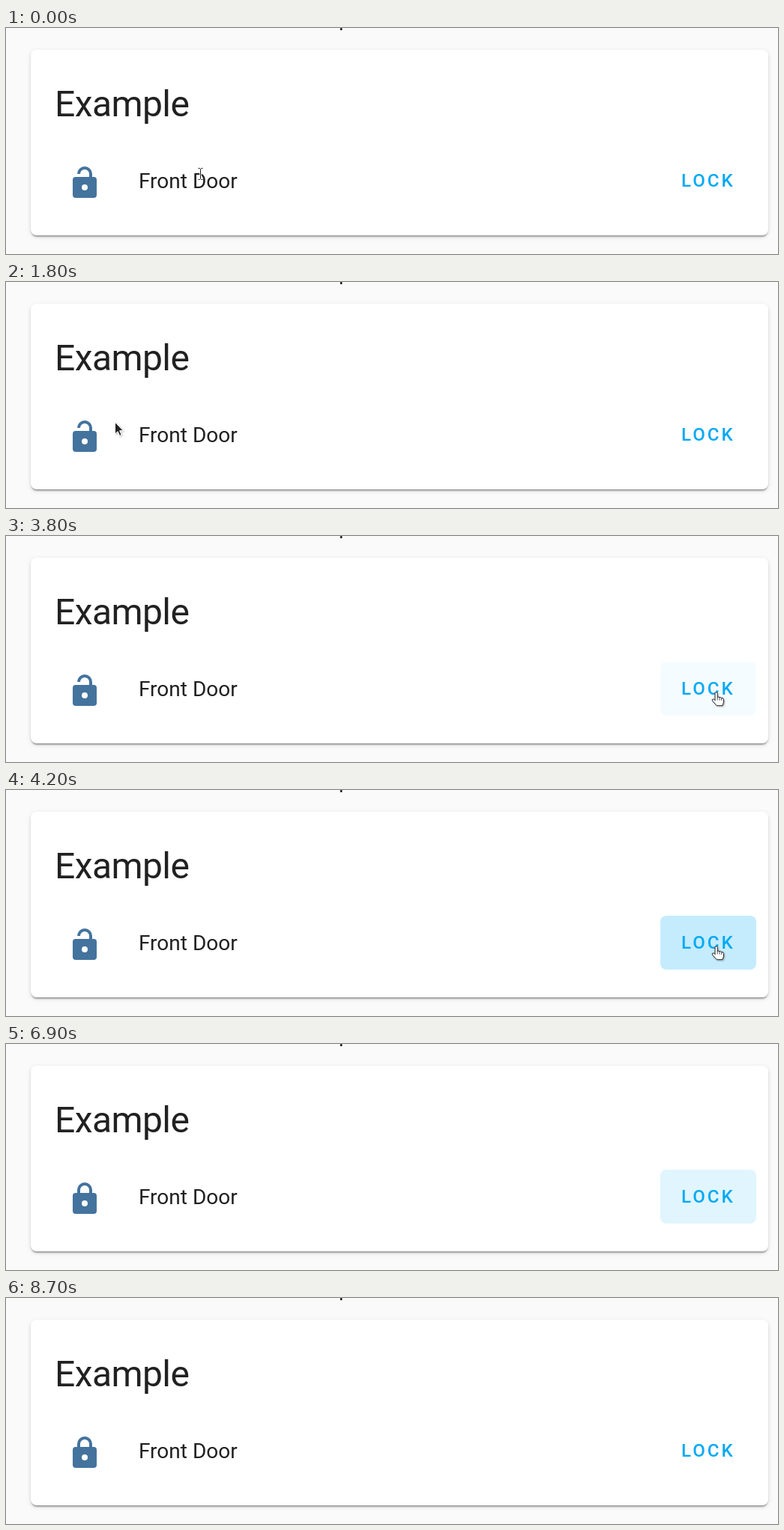
Animation of 1030x302 px, one loop 8.8 s. Source, as an HTML page:

```html
<!DOCTYPE html>
<html lang="en">
<head>
<meta charset="utf-8">
<title>Lock card</title>
<style>
  html, body { margin: 0; width: 100%; height: 100%; overflow: hidden; background: #fafafa; }
  .card {
    position: absolute; left: 33px; top: 29px; width: 984px; height: 248px;
    border-radius: 8px; background: #fff;
    box-shadow: 0 4px 2px -2px rgba(0,0,0,.2), 0 2px 2px 0 rgba(0,0,0,.14), 0 2px 6px 0 rgba(0,0,0,.12);
  }
  svg { position: absolute; left: 0; top: 0; display: block; }
  text { font-family: Roboto, sans-serif; fill: #212121; white-space: pre; }
  .title { font-size: 48px; letter-spacing: -.576px; }
  .body { font-size: 28px; }
  #label { font-size: 24px; font-weight: 500; letter-spacing: 3px; fill: #03a9f4; }
</style>
</head>
<body>
<div class="card"></div>
<svg width="1030" height="302" viewBox="0 0 1030 302">
  <defs>
    <clipPath id="clip"><rect x="873" y="168" width="128" height="72" rx="8"/></clipPath>
    <filter id="shade" x="-50%" y="-50%" width="200%" height="200%">
      <feDropShadow dx="1" dy="1" stdDeviation="1" flood-opacity=".3"/>
    </filter>
  </defs>
  <text class="body" x="444" y="-3">p</text>
  <text class="title" x="65" y="118">Example</text>
  <path id="icon" transform="translate(81 183) scale(2)" fill="#44739e" fill-rule="evenodd"/>
  <rect id="mark" y="188" height="33" fill="#e95420"/>
  <text class="body" x="177" y="214"><tspan id="first">Front </tspan><tspan id="second">Door</tspan></text>
  <g clip-path="url(#clip)" fill="#03a9f4">
    <rect id="tint" x="873" y="168" width="128" height="72"/>
    <circle id="ripple"/>
  </g>
  <text id="label" x="901" y="212">LOCK</text>
  <g id="beam" fill="none">
    <path id="beamBack" stroke="#fff" stroke-opacity=".8" stroke-width="3" d="M-3 .5h2l1 1 1-1h2M0 1.5v13M-3 15.5h2l1-1 1 1h2"/>
    <path stroke="#222" d="M-3 .5h2l1 1 1-1h2M0 1.5v13M-3 15.5h2l1-1 1 1h2"/>
  </g>
  <g id="arrow" filter="url(#shade)">
    <path d="M.5 .3V16L4.1 12.7 6.7 18.5 9.2 17.4 6.6 11.7H11.4Z" fill="#222" stroke="#fff" stroke-linejoin="round"/>
  </g>
  <g id="hand" filter="url(#shade)" fill="#fff" stroke="#222" stroke-linejoin="round" stroke-linecap="round">
    <path d="M4.5 10.5V2.3a1.6 1.6 0 0 1 3.2 0V7.3q1.6-.8 2.8.5 1.6-.6 2.7.7 2.8-.3 2.8 2.2V14l-1.4 4.7H6.8L1 12.3Q0 10.3 1.8 9.9 3 9.7 4.5 11.4Z"/>
    <path d="M7.7 7.5V11M10.5 8V11.2M13.2 8.7V11.5" fill="none" stroke-width=".8"/>
  </g>
</svg>
<script>
const LOOP = 8800, STEP = 100;
const $ = id => document.getElementById(id);
const set = (id, attrs) => { for (const k in attrs) $(id).setAttribute(k, attrs[k]); };
const mix = (a, b, k) => a + (b - a) * k;
const smooth = k => k * k * (3 - 2 * k);

const hole = "M12,17A2,2 0 0,0 14,15A2,2 0 0,0 12,13A2,2 0 0,0 10,15A2,2 0 0,0 12,17Z";
const body = "M18,8A2,2 0 0,1 20,10V20A2,2 0 0,1 18,22H6A2,2 0 0,1 4,20V10A2,2 0 0,1 6,8";
const icons = {
  open: body + "H15V6A3,3 0 0,0 9,6H7A5,5 0 0,1 17,6V8Z" + hole,
  shut: body + "H7V6A5,5 0 0,1 17,6V8ZM12,3A3,3 0 0,0 9,6V8H15V6A3,3 0 0,0 12,3Z" + hole,
  wait: "M8.5,2C6,2 4,4 4,6.5V7C2.89,7 2,7.89 2,9V18C2,19.11 2.89,20 4,20H8.72C10.18,21.29 12.06,22 14,22" +
    "A8,8 0 0,0 14,6H13C12.77,3.75 10.84,2 8.5,2ZM8.5,4A2.5,2.5 0 0,1 11,6.5V7H6V6.5A2.5,2.5 0 0,1 8.5,4Z" +
    "M14,8A6,6 0 0,1 14,20A6,6 0 0,1 14,8ZM13,10V15L16.64,17.19 17.42,15.9 14.5,14.15V10Z"
};

// Returns [kind, x, y], or nothing while the pointer is away.
function pointer(t) {
  if (t < 1800) return ["beam", 259.5, 187];
  if (t < 1900) return ["arrow", 145, 187];
  if (t < 2200) return;
  if (t < 2300) return ["arrow", 75, 217];
  if (t < 2700) return ["arrow", 103, 223];
  if (t < 2900) return ["arrow", 102, 222];
  if (t < 3800) {
    const k = (t - 2800) / 900;
    return ["arrow", mix(102, 861, smooth(k)), mix(222, 195, k) - 24 * Math.sin(Math.PI * k)];
  }
  if (t < 6200) return ["hand", 941.5, 208];
  if (t < 6600) {
    const k = ((t - 6100) / 400) ** 2, y = mix(208, 35, k);
    return [y > 168 ? "hand" : "arrow", mix(942, 927, k), y];
  }
}

function selectionStart(t) {
  if (t < 600 || t >= 1800) return 309;
  return t < 1000 || (t >= 1200 && t < 1400) ? 249 : 177;
}

function tint(t) {
  if (t < 3800 || t >= 8700) return 0;
  if (t < 4100) return .04;
  return t < 8600 ? .12 : .06;
}

function draw(now) {
  const t = Math.floor(now % LOOP / STEP) * STEP;
  set("icon", { d: t < 5400 ? icons.open : t < 6900 ? icons.wait : icons.shut });

  const start = selectionStart(t);
  set("mark", { x: start, width: 309 - start });
  $("first").style.fill = start < 249 ? "#fff" : "";
  $("second").style.fill = start < 309 ? "#fff" : "";

  set("tint", { opacity: tint(t) });
  const age = t - 4100, grow = smooth(Math.min(1, (age + 60) / 225));
  set("ripple", {
    cx: mix(947, 937, grow), cy: mix(209, 204, grow), r: Math.max(0, mix(38, 84, grow)),
    opacity: age < 0 || age >= 400 ? 0 : age < 300 ? .12 : .05
  });

  const at = pointer(t);
  for (const id of ["beam", "arrow", "hand"]) {
    const on = at && at[0] === id;
    set(id, { visibility: on ? "visible" : "hidden" });
    if (on) set(id, { transform: `translate(${at[1]} ${at[2]})` });
  }
}

const begin = performance.now();
function tick() {
  draw(performance.now() - begin);
  requestAnimationFrame(tick);
}
tick();
</script>
</body>
</html>
```
